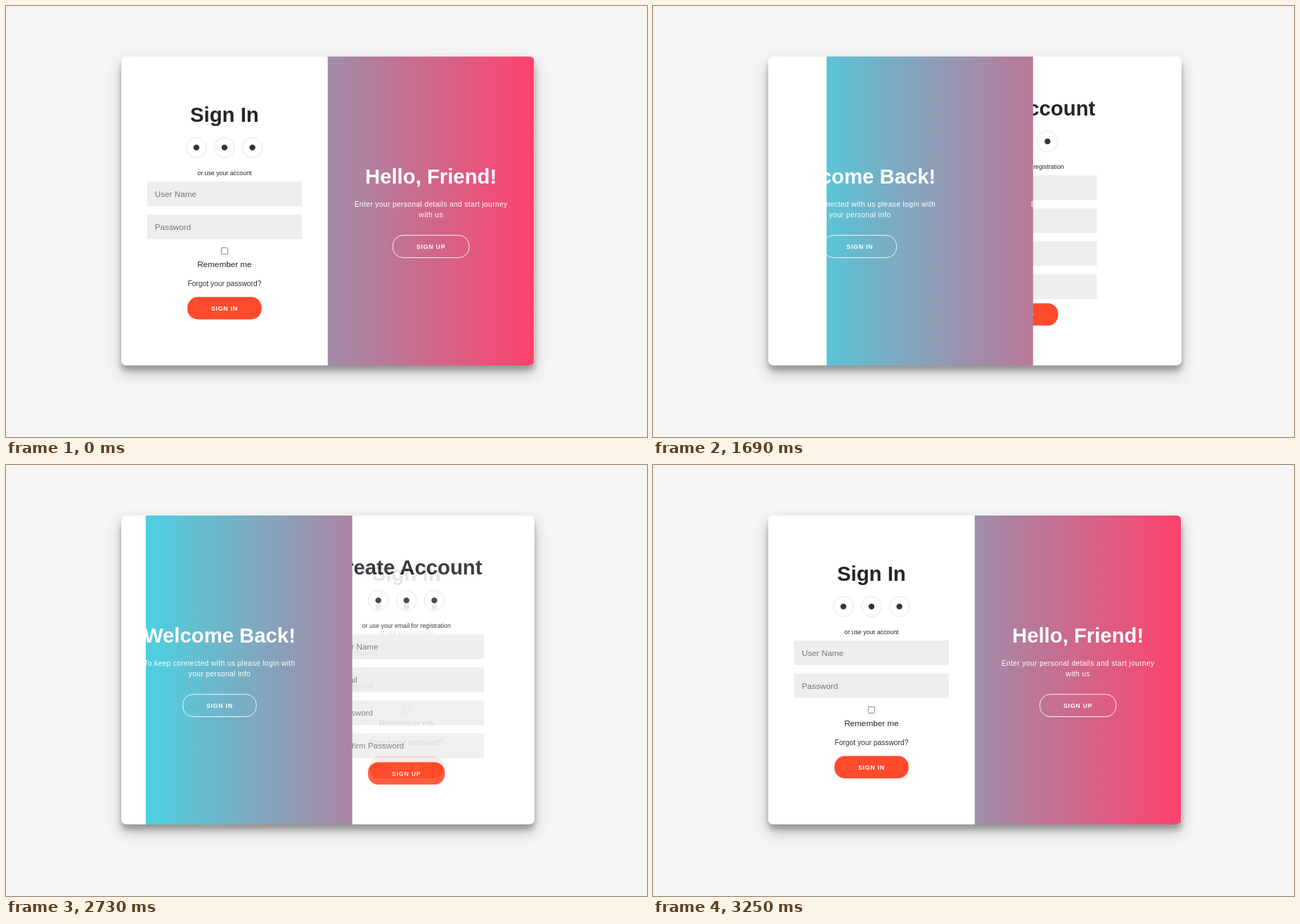
Recreate the animation shown at these times as an HTML page. Size 912 px wide and 614 px high, loop 4.03 s.

```html
<!DOCTYPE html>
<html lang="en">
<head>
<meta charset="utf-8">
<title>Sliding sign in form</title>
<style>
  html, body { margin: 0; width: 100%; height: 100%; overflow: hidden; background: #f5f5f6; }
  .card {
    position: absolute; left: 164px; top: 72px; width: 587.5px; height: 440px;
    border-radius: 7.3px; overflow: hidden; background: #fff;
    box-shadow: 0 10.3px 20.5px rgba(0,0,0,.25), 0 7.3px 7.3px rgba(0,0,0,.22);
  }
  svg { display: block; width: 100%; height: 100%; }
  text { font-family: "Liberation Sans", Arial, sans-serif; fill: #212529; text-anchor: middle; }
  .title { font-size: 29.3px; font-weight: 700; }
  .note { font-size: 8.8px; }
  .label { font-size: 11.73px; }
  .link { font-size: 10.27px; fill: #333; }
  .lead { font-size: 10.27px; letter-spacing: .367px; }
  .caption { font-size: 8.8px; font-weight: 700; letter-spacing: .733px; fill: #fff; }
  .hint { font-size: 11.73px; fill: #757575; text-anchor: start; }
  .field { fill: #eee; }
  .ring { fill: none; stroke: #ddd; stroke-width: .8; }
  .dot { fill: #333; }
  .check { fill: #fff; stroke: #767676; stroke-width: .9; }
  .solid { fill: #ff4b2b; }
  .ghost { fill: none; stroke: #fff; stroke-width: .9; }
  #overlay text { fill: #fff; }
</style>
</head>
<body>
<div class="card">
  <svg viewBox="164 72 587.5 440">
    <defs>
      <linearGradient id="blend">
        <stop offset="0" stop-color="#40dae8"/>
        <stop offset="1" stop-color="#ff416c"/>
      </linearGradient>
      <clipPath id="window"><rect id="pane" y="72" width="293.75" height="440"/></clipPath>
    </defs>
    <g id="forms"><g id="signUp"></g><g id="signIn"></g></g>
    <g id="overlay" clip-path="url(#window)">
      <rect x="164" y="72" width="587.5" height="440" fill="url(#blend)"/>
      <g id="welcome"></g>
      <g id="hello"></g>
    </g>
  </svg>
</div>
<script>
const LOOP = 4030, STEP = 130, SLIDE = 600;
const HALF = 293.75, LEFT = 164, MIDDLE = LEFT + HALF;
const CX = LEFT + HALF / 2, CX_RIGHT = CX + HALF;
const TO_SIGN_UP = 1311, TO_SIGN_IN = 2586;
const $ = id => document.getElementById(id);

function add(parent, tag, attrs, content = '') {
  const node = document.createElementNS('http://www.w3.org/2000/svg', tag);
  for (const key in attrs) node.setAttribute(key, attrs[key]);
  node.textContent = content;
  parent.append(node);
  return node;
}

const label = (parent, cls, x, y, content) => add(parent, 'text', { class: cls, x, y }, content);

function button(parent, cls, cx, top, width, content) {
  const group = add(parent, 'g', {});
  add(group, 'rect', { class: cls, x: cx - width / 2, y: top, width, height: 31.8, rx: 14.7 });
  label(group, 'caption', cx, top + 19, content);
  return group;
}

function form(parent, title, note, y, hints) {
  add(parent, 'rect', { x: LEFT, y: 72, width: HALF, height: 440, fill: '#fff' });
  label(parent, 'title', CX, y, title);
  for (const dx of [-40, 0, 39.7]) {
    add(parent, 'circle', { class: 'ring', cx: CX + dx, cy: y + 36.7, r: 14.4 });
    add(parent, 'circle', { class: 'dot', cx: CX + dx, cy: y + 36.7, r: 4.2 });
  }
  label(parent, 'note', CX, y + 75.8, note);
  hints.forEach((hint, i) => {
    const top = y + 85.2 + i * 47;
    add(parent, 'rect', { class: 'field', x: CX - 110.1, y: top, width: 220.2, height: 35.1 });
    label(parent, 'hint', CX - 99.1, top + 21.6, hint);
  });
}

function panel(parent, cx, title, lines, caption, width) {
  label(parent, 'title', cx, 253.2, title);
  lines.forEach((line, i) => label(parent, 'lead', cx, 286.1 + i * 14.7, line));
  return button(parent, 'ghost', cx, 326.7, width, caption);
}

form($('signIn'), 'Sign In', 'or use your account', 164.9, ['User Name', 'Password']);
add($('signIn'), 'rect', { class: 'check', x: CX - 4.6, y: 344.3, width: 9.2, height: 9.2, rx: 1.8 });
label($('signIn'), 'label', CX, 372, 'Remember me');
label($('signIn'), 'link', CX, 399.1, 'Forgot your password?');
button($('signIn'), 'solid', CX, 414.6, 105.5, 'SIGN IN');

form($('signUp'), 'Create Account', 'or use your email for registration', 156.2,
  ['User Name', 'Email', 'Password', 'Confirm Password']);
button($('signUp'), 'solid', CX, 423.5, 109.5, 'SIGN UP');

const signInButton = panel($('welcome'), CX, 'Welcome Back!',
  ['To keep connected with us please login with', 'your personal info'], 'SIGN IN', 104.6);
const signUpButton = panel($('hello'), CX_RIGHT, 'Hello, Friend!',
  ['Enter your personal details and start journey', 'with us'], 'SIGN UP', 108.6);

// cubic-bezier(.42, 0, .58, 1), solved by bisection
function easeInOut(x) {
  if (x <= 0 || x >= 1) return x <= 0 ? 0 : 1;
  let low = 0, high = 1;
  for (let i = 0; i < 24; i++) {
    const s = (low + high) / 2;
    const at = 3 * s * (1 - s) * ((1 - s) * .42 + s * .58) + s ** 3;
    if (at < x) low = s; else high = s;
  }
  return low * low * (3 - 2 * low);
}

const shift = (node, dx) => node.setAttribute('transform', `translate(${dx} 0)`);

function press(node, cx, down) {
  const scale = down ? .95 : 1;
  node.setAttribute('transform', `translate(${cx} 342.6) scale(${scale}) translate(${-cx} -342.6)`);
}

function render(t) {
  const returning = t >= TO_SIGN_IN;
  const x = (t - (returning ? TO_SIGN_IN : TO_SIGN_UP)) / SLIDE;
  const eased = easeInOut(x);
  const p = returning ? 1 - eased : eased;

  $('pane').setAttribute('x', MIDDLE - HALF * p);
  shift($('welcome'), -.2 * HALF * (1 - p));
  shift($('hello'), .2 * HALF * p);
  shift($('signIn'), HALF * p);
  shift($('signUp'), HALF * p);

  // Going out the new form pops in halfway; coming back it fades, then drops behind.
  const signUpOnTop = returning ? p > .375 : x >= .5;
  $('signUp').setAttribute('opacity', returning ? p : +signUpOnTop);
  const top = signUpOnTop ? $('signUp') : $('signIn');
  if ($('forms').lastElementChild !== top) $('forms').append(top);

  press(signUpButton, CX_RIGHT, t >= 1300 && t < 1430);
  press(signInButton, CX, t >= 2470 && t < 2730);
}

const start = performance.now();
function tick() {
  const t = (performance.now() - start) % LOOP;
  render(Math.floor(t / STEP) * STEP);
  requestAnimationFrame(tick);
}
tick();
</script>
</body>
</html>
```
